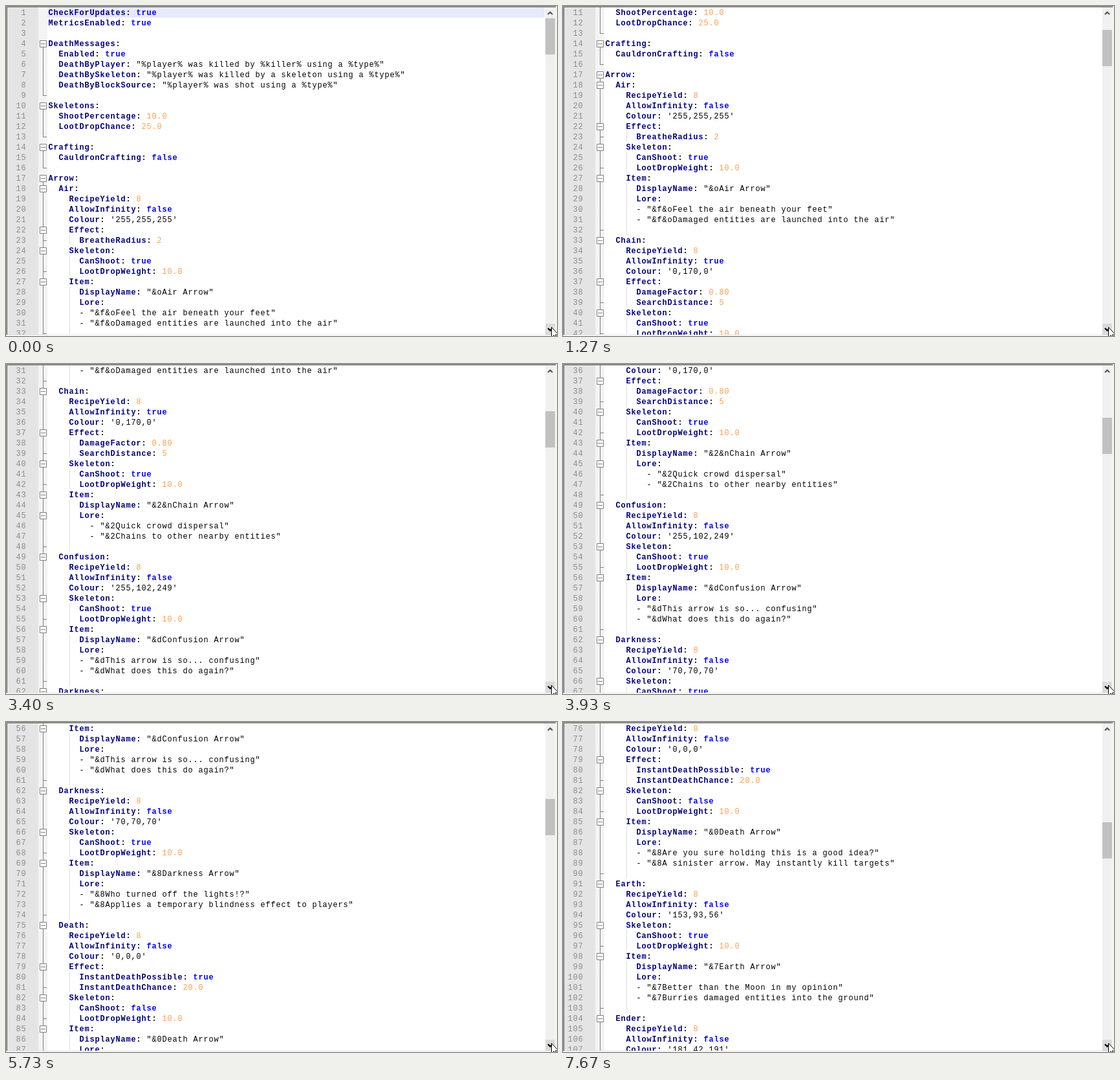
An HTML page that plays this animation: 852x510 px, repeating every 8000 ms.

```html
<!DOCTYPE html>
<html lang="en">
<head>
<meta charset="utf-8">
<title>Scrolling config file</title>
<style>
  html, body { margin: 0; width: 100%; height: 100%; overflow: hidden; background: #fff; }
  svg { display: block; }
  text { font: 12px "Liberation Mono", "Courier New", monospace; letter-spacing: .8px; white-space: pre; }
  .key, .colon, .word { font-weight: bold; }
  .key { fill: #000080; }
  .word { fill: #00f; }
  .num { fill: #ff9f50; }
  .line { fill: #8c8c8c; text-anchor: end; }
  path { fill: none; }
</style>
</head>
<body>
<svg width="852" height="510" viewBox="0 0 852 510">
  <defs>
    <pattern id="checker" width="2" height="2" patternUnits="userSpaceOnUse">
      <path style="fill:#fff" d="M0 0h2v2h-2z"/>
      <path style="fill:#e9e9e9" d="M0 0h1v1h-1zM1 1h1v1h-1z"/>
    </pattern>
  </defs>
  <rect width="852" height="510" fill="#fff"/>
  <rect x="2" y="2" width="48" height="506" fill="#e4e4e4"/>
  <rect x="50" y="2" width="14" height="506" fill="url(#checker)" shape-rendering="crispEdges"/>
  <g id="page">
    <rect x="64" y="2" width="769" height="16" fill="#e8e8ff"/>
    <path id="guides" stroke="#c0c0c0" stroke-dasharray="1 1"/>
    <path id="folds" stroke="#808080"/>
    <path id="boxes" stroke="#808080" style="fill:#fff"/>
  </g>

  <rect x="833" y="2" width="17" height="506" fill="#fff"/>
  <rect x="834" y="2" width="15" height="506" fill="#f0f0f0"/>
  <rect id="thumb" x="834" y="19" width="15" height="56" fill="#c1c1c1"/>
  <rect x="834" y="491" width="15" height="17" fill="#dadada"/>
  <path d="M838 13l3.5-3.5 3.5 3.5" stroke="#505050" stroke-width="2"/>
  <path d="M838 498l3.5 3.5 3.5-3.5" stroke="#000" stroke-width="2.2"/>

  <path d="M0 .5H851M.5 0V509" stroke="#a0a0a0"/>
  <path d="M1 1.5H850M1.5 1V508" stroke="#696969"/>
  <path d="M1 508.5H851M850.5 1V509" stroke="#e3e3e3"/>
  <path d="M0 509.5H852M851.5 0V510" stroke="#fff"/>
  <path d="M843.5 496.5v16l3.7-3.6 2.6 6 2.2-1-2.6-5.8h5z" stroke="#000" style="fill:#fff"/>
</svg>
<script>
const lines = `CheckForUpdates: true
MetricsEnabled: true

DeathMessages:
  Enabled: true
  DeathByPlayer: "%player% was killed by %killer% using a %type%"
  DeathBySkeleton: "%player% was killed by a skeleton using a %type%"
  DeathByBlockSource: "%player% was shot using a %type%"

Skeletons:
  ShootPercentage: 10.0
  LootDropChance: 25.0

Crafting:
  CauldronCrafting: false

Arrow:
  Air:
    RecipeYield: 8
    AllowInfinity: false
    Colour: '255,255,255'
    Effect:
      BreatheRadius: 2
    Skeleton:
      CanShoot: true
      LootDropWeight: 10.0
    Item:
      DisplayName: "&oAir Arrow"
      Lore:
      - "&f&oFeel the air beneath your feet"
      - "&f&oDamaged entities are launched into the air"

  Chain:
    RecipeYield: 8
    AllowInfinity: true
    Colour: '0,170,0'
    Effect:
      DamageFactor: 0.80
      SearchDistance: 5
    Skeleton:
      CanShoot: true
      LootDropWeight: 10.0
    Item:
      DisplayName: "&2&nChain Arrow"
      Lore:
        - "&2Quick crowd dispersal"
        - "&2Chains to other nearby entities"

  Confusion:
    RecipeYield: 8
    AllowInfinity: false
    Colour: '255,102,249'
    Skeleton:
      CanShoot: true
      LootDropWeight: 10.0
    Item:
      DisplayName: "&dConfusion Arrow"
      Lore:
      - "&dThis arrow is so... confusing"
      - "&dWhat does this do again?"

  Darkness:
    RecipeYield: 8
    AllowInfinity: false
    Colour: '70,70,70'
    Skeleton:
      CanShoot: true
      LootDropWeight: 10.0
    Item:
      DisplayName: "&8Darkness Arrow"
      Lore:
      - "&8Who turned off the lights!?"
      - "&8Applies a temporary blindness effect to players"

  Death:
    RecipeYield: 8
    AllowInfinity: false
    Colour: '0,0,0'
    Effect:
      InstantDeathPossible: true
      InstantDeathChance: 20.0
    Skeleton:
      CanShoot: false
      LootDropWeight: 10.0
    Item:
      DisplayName: "&0Death Arrow"
      Lore:
      - "&8Are you sure holding this is a good idea?"
      - "&8A sinister arrow. May instantly kill targets"

  Earth:
    RecipeYield: 8
    AllowInfinity: false
    Colour: '153,93,56'
    Skeleton:
      CanShoot: true
      LootDropWeight: 10.0
    Item:
      DisplayName: "&7Earth Arrow"
      Lore:
      - "&7Better than the Moon in my opinion"
      - "&7Burries damaged entities into the ground"

  Ender:
    RecipeYield: 8
    AllowInfinity: false
    Colour: '181,42,191'`.split("\n");

const ROW = 16, COL = 8, TEXT_X = 65, STEP = 5, LOOP = 8000;
const scrollTimes = [600, 1270, 1670, 2330, 2930, 3400, 3870, 4330,
                     4800, 5270, 5730, 6130, 6600, 7070, 7670];
const byId = id => document.getElementById(id);
const page = byId("page"), thumb = byId("thumb");

function add(parent, tag, cls, text, attrs = {}) {
  const el = document.createElementNS("http://www.w3.org/2000/svg", tag);
  if (cls) el.setAttribute("class", cls);
  for (const name in attrs) el.setAttribute(name, attrs[name]);
  el.textContent = text;
  return parent.appendChild(el);
}

function valueClass(value) {
  if (/^(true|false)$/.test(value)) return "word";
  return /^[\d.]+$/.test(value) ? "num" : "";
}

function addText(line, y) {
  const indent = line.search(/\S/);
  const body = line.slice(indent);
  const row = add(page, "text", "", "", { x: TEXT_X + .4 + indent * COL, y });
  const pair = body.match(/^(\w+):(?: (.*))?$/);
  if (!pair) {
    row.textContent = body;
    return;
  }
  add(row, "tspan", "key", pair[1]);
  add(row, "tspan", "colon", ":");
  if (pair[2]) add(row, "tspan", valueClass(pair[2]), " " + pair[2]);
}

let guides = "", folds = "", boxes = "", level = 0;
lines.forEach((line, i) => {
  const top = 2 + i * ROW, mid = top + 8.5;
  if (line) level = line.search(/\S/);   // blank lines stay in the block above
  const next = lines[i + 1] ? lines[i + 1].search(/\S/) : level;
  const header = next > level, ends = next < level;

  add(page, "text", "line", i + 1, { x: 31.4, y: top + 12 });
  if (line) addText(line, top + 12);
  if (level > 4) guides += `M98.5 ${top}v${ROW}`;
  if (level) folds += `M57.5 ${top}v${ends && !next ? 9 : ROW}`;
  else if (header) folds += `M57.5 ${mid}V${top + ROW}`;
  if (ends) folds += `M57.5 ${mid}h5.5`;
  if (header) boxes += `M52.5 ${mid - 5}h10v10h-10zM54 ${mid}h7`;
});
byId("guides").setAttribute("d", guides);
byId("folds").setAttribute("d", folds);
byId("boxes").setAttribute("d", boxes);

function draw(now) {
  const t = now % LOOP;
  const first = STEP * scrollTimes.filter(s => t >= s).length;
  page.setAttribute("transform", `translate(0 ${-first * ROW})`);
  thumb.setAttribute("y", 19 + Math.round(first * 1.815));
}

const start = performance.now();
function tick() {
  draw(performance.now() - start);
  requestAnimationFrame(tick);
}
tick();
</script>
</body>
</html>
```
